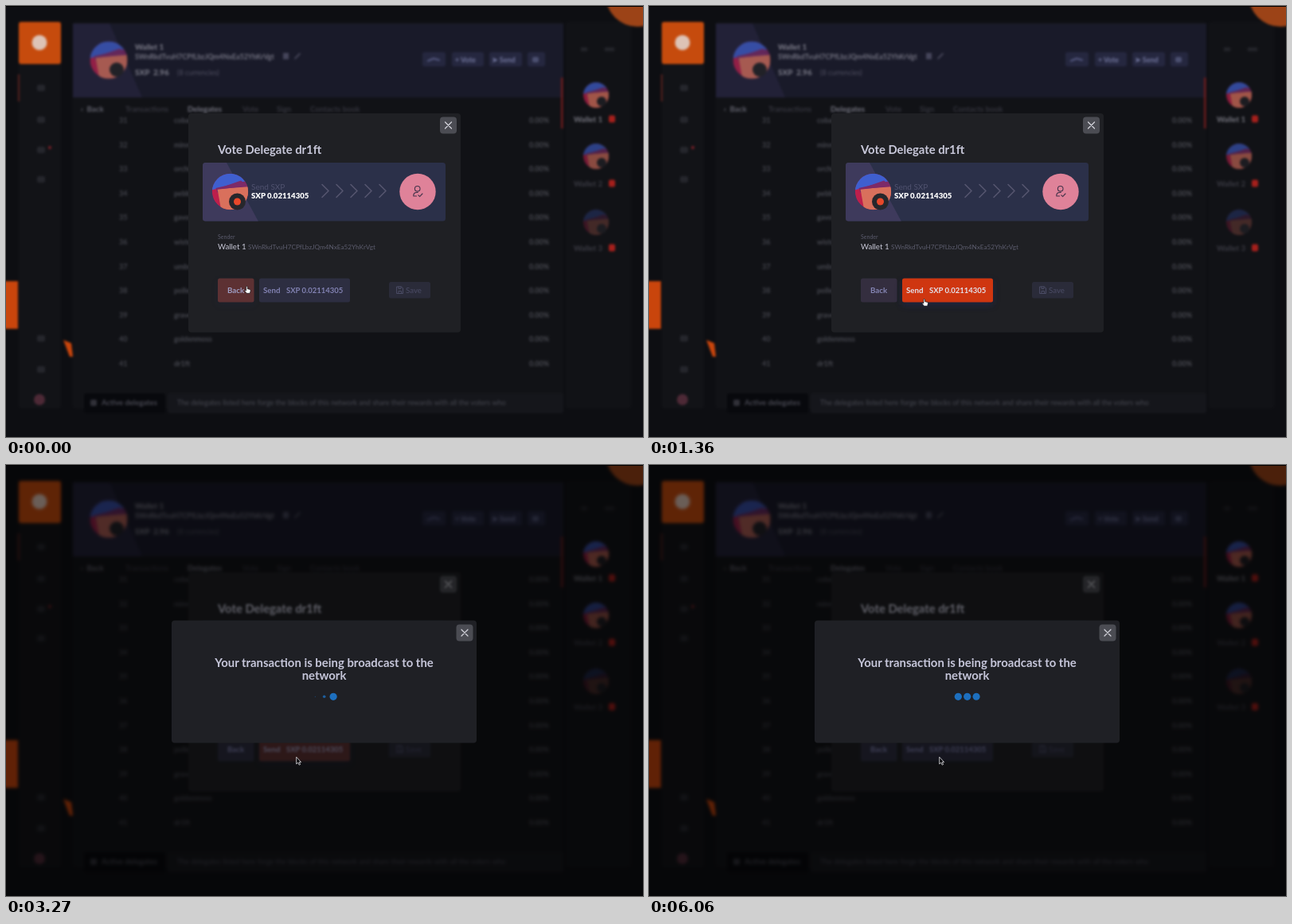
Recreate the animation shown at these times as an HTML page. Size 800x542 px, loop 6090 ms.

```html
<!DOCTYPE html>
<html lang="en">
<head>
<meta charset="utf-8">
<title>Vote confirmation</title>
<style>
  html, body { margin: 0; width: 100%; height: 100%; overflow: hidden; background: #08090c; }
  svg { display: block; width: 100vw; height: 100vh; }
  text { font-family: Lato, "Open Sans", sans-serif; white-space: pre; }
  #back { filter: blur(1.8px); }
  #scene.dimmed { filter: blur(1.8px) brightness(.48); }
</style>
</head>
<body>
<svg id="stage" viewBox="0 0 800 542"></svg>
<script>
const LOOP = 6090, SWITCH = 3082;

const rect = (x, y, w, h, fill, r = 0, more = '') =>
  `<rect x="${x}" y="${y}" width="${w}" height="${h}" rx="${r}" fill="${fill}" ${more}/>`;
const disc = (x, y, r, fill, more = '') => `<circle cx="${x}" cy="${y}" r="${r}" fill="${fill}" ${more}/>`;
const shape = (d, fill) => `<path d="${d}" fill="${fill}"/>`;
const line = (d, stroke, w = 1) =>
  `<path d="${d}" fill="none" stroke="${stroke}" stroke-width="${w}" stroke-linecap="round" stroke-linejoin="round"/>`;
const text = (x, y, size, fill, str, weight = 400, more = '') =>
  `<text x="${x}" y="${y}" font-size="${size}" fill="${fill}" font-weight="${weight}" ${more}>${str}</text>`;
const avatar = (x, y, r, opacity = 1) =>
  `<use href="#avatar" transform="translate(${x} ${y}) scale(${r})" opacity="${opacity}"/>`;
const closeButton = (x, y) => rect(x, y, 21, 21, '#4b4c53', 4) +
  line(`M${x + 6.5} ${y + 6.5}l8 8m0-8l-8 8`, '#d4d4dc', 1.2);

const defs = `<defs>
  <clipPath id="round"><circle r="1"/></clipPath>
  <clipPath id="card"><rect x="247" y="197" width="305" height="73.5" rx="3.5"/></clipPath>
  <filter id="glow" x="-30%" y="-60%" width="160%" height="220%"><feGaussianBlur stdDeviation="4"/></filter>
  <g id="avatar" clip-path="url(#round)">
    ${disc(0, 0, 1, '#bd1f4c')}
    ${shape('M-1-1H1V-.6L-1-.1z', '#3f5fcf')}
    ${shape('M-.8-.2L1-.62V-.05L-.7.05z', '#7d2a68')}
    ${shape('M-.7-.12L1-.32V1H-.5z', '#d9705c')}
    ${shape('M-.75-.14L.6-.62L1-.28z', '#7d2a68')}
  </g>
</defs>`;

function background() {
  const names = ['cobalt', 'minnow', 'orchid', 'pebble', 'gavotte', 'wisteria', 'umbra', 'pollen', 'gravel', 'quartzo'];
  let s = rect(-9, -9, 818, 560, '#0d0e12');
  s += rect(16, 20, 53, 486, '#121317', 4) + rect(84, 20, 616, 486, '#111216', 4) + rect(703, 20, 82, 486, '#111216', 4);
  s += disc(793, -14, 40, '#9c4317') + rect(-6, 346, 21, 60, '#c9450c');
  s += shape('M72 420L82 424L84 441L80 441z', '#c9450c');
  // sidebar
  s += rect(16, 20, 53, 53, '#c64b0d', 3) + disc(42, 46, 9.5, '#ddc3b6');
  for (const y of [103, 143, 181, 218, 418, 457]) s += rect(39, y - 4, 10, 8, '#25262c', 2);
  s += disc(55, 178, 2, '#7d2028') + disc(42, 495, 7, '#4d2936') + rect(15, 86, 2, 34, '#55201d');
  // account header
  s += rect(84, 22, 616, 93, '#191a29') + shape('M84 22H130L171 115H84z', '#222137');
  s += avatar(129, 68, 23.5, .72) + disc(139, 80, 9, '#212127');
  s += text(162, 55, 9.7, '#82828f', 'Wallet 1', 700);
  s += text(162, 66.5, 8.8, '#747482', 'SWnRkdTvuH7CPfLbzJQm4NxEa52YhKrVgt', 700);
  s += rect(348, 59, 7, 8, '#45455a') + line('M363 66l6-6', '#55556a', 1.5);
  s += text(162, 87, 10, '#80808d', 'SXP  2.96', 700) + text(215, 87, 9, '#4f4f60', '(8 currencies)');
  [[523, 29], [560, 40], [607, 41], [655, 22]].forEach(([x, w]) => s += rect(x, 58, w, 18, '#25273f', 3));
  s += line('M530 69l7-3l7 2', '#565a82', 2) + text(564, 71, 9, '#7478a0', '+ Vote', 700);
  s += text(610, 71, 9, '#7478a0', '➤ Send', 700) + rect(661, 64, 8, 7, '#4b4f70', 2);
  // tabs
  [[94, '‹  Back', '#62626d'], [150, 'Transactions', '#34343d'], [228, 'Delegates', '#73737f'],
   [297, 'Vote', '#34343d'], [340, 'Sign', '#34343d'], [382, 'Contacts book', '#34343d']]
    .forEach(([x, str, fill]) => s += text(x, 133, 9.7, fill, str, 700));
  // delegate table
  for (let i = 0; i <= 10; i++) {
    const y = 147 + i * 30.6, name = i === 10 ? 'dr1ft' : i === 9 ? 'goldenmoss' : names[i];
    s += text(142, y, 9, '#43444c', 31 + i, 700) + text(211, y, 9, '#484951', name, 700);
    s += text(657, y, 9, '#4a4b52', '0.00%', 700);
  }
  // footer
  s += rect(98, 487, 102, 25, '#08090d', 3) + rect(203, 487, 497, 25, '#15161b', 3);
  s += rect(106, 495, 8, 8, '#303038', 2) + text(120, 502, 9.5, '#484852', 'Active delegates', 700);
  s += text(215, 502, 9, '#474851',
    'The delegates listed here forge the blocks of this network and share their rewards with all the voters who', 400);
  // account list
  s += rect(697, 90, 2.5, 64, '#6d1b1b') + rect(722, 52, 8, 5, '#222329') + rect(752, 52, 12, 5, '#222329');
  [[112, .72, '#777780'], [189, .6, '#3b3b44'], [272, .25, '#3b3b44']].forEach(([y, o, fill], i) => {
    s += avatar(741, y, 16, o) + disc(748, y + 8, 6, '#1c1c21');
    const labelY = [145.5, 226.5, 307.5][i];
    s += text(713, labelY, 9.7, fill, `Wallet ${i + 1}`, 700) + rect(757, labelY - 8, 8, 9, '#a51f1b', 2);
  });
  return s;
}

function dialog() {
  let s = rect(229, 135, 342, 275.5, '#1f2024', 4) + closeButton(545, 139.5);
  s += text(266, 186, 14.8, '#c8c8da', 'Vote Delegate dr1ft', 700);
  s += `<g clip-path="url(#card)">${rect(247, 197, 305, 74, '#2b3049')}${shape('M247 197H277L317 271H247z', '#3e3a5c')}</g>`;
  s += avatar(281.5, 233.5, 22.7) + disc(290.5, 246, 10.5, '#27272c') + disc(290.5, 246, 4.5, '#e8482a');
  s += text(308, 231, 10, '#50526f', 'Send SXP') + text(308, 242, 9.6, '#fff', 'SXP 0.02114305', 900);
  for (let i = 0; i < 5; i++) s += line(`M${397 + 18 * i} 224.5l8 8l-8 8`, '#55566f', 1.6);
  s += disc(517, 233.5, 22.7, '#df8299') + disc(516.7, 229.8, 3.3, 'none', 'stroke="#43334a" stroke-width="1.1"');
  s += line('M515.5 239H511.8V237.6Q512.2 234.8 515.2 234.5H517.2M517.8 237.8l1.8 1.8l3.4-3.6', '#43334a', 1.1);
  s += text(266, 293, 7, '#5a5a6c', 'Sender') + text(266, 306, 9.7, '#cbcbda', 'Wallet 1');
  s += text(304, 306, 8.2, '#5c5c6d', 'SWnRkdTvuH7CPfLbzJQm4NxEa52YhKrVgt');
  const button = (id, x, w, label) => `<g id="${id}">
    ${rect(x, 346, w, 30, '#1d2552', 3, 'filter="url(#glow)" opacity="0"')}${rect(x, 342.5, w, 30, '#2d2e41', 2.5)}${label}</g>`;
  s += button('backButton', 266, 45.5, text(278, 360.5, 9.7, '#8282b2', 'Back', 700));
  s += button('sendButton', 318, 114, text(323, 360.5, 9.7, '#8282b2', 'Send', 700) +
    text(352, 360.5, 9.5, '#8282b2', 'SXP 0.02114305', 700));
  s += rect(481, 347, 52, 20.5, '#2a2b39', 2.5) + text(502, 360.5, 9.7, '#4b4c65', 'Save', 400);
  s += line('M491 353h5.5l2 2v6.5h-7.5zM493 353v2.5h3v-2.5M493 361.5v-3h3.5v3', '#4b4c65');
  return s;
}

const centred = 'text-anchor="middle"';
const notice = rect(208, 195.5, 383, 154, '#1f2025', 4) + closeButton(565.5, 200.5) +
  text(399.5, 254, 14.9, '#c6c6da', 'Your transaction is being broadcast to the', 700, centred) +
  text(399.5, 270, 14.9, '#c6c6da', 'network', 700, centred) +
  [388.3, 399.7, 411.1].map(x => disc(x, 291.3, 4.6, '#1d6fbe', 'class="dot"')).join('');

const hand = `<path d="M-1.4-4.2Q-.5-5.1 .3-4V-1.3L3.4-.6Q4.3-.2 4.1 1.2L3.4 4.3H-.8L-3.4 1Q-3.2-.1-1.4 .9z"
  fill="#fff" stroke="#15151a" stroke-width=".7"/>`;
const arrow = `<path d="M364.7 367.2V376L366.7 374.2L368.2 377.2L369.6 376.5L368.2 373.7H370.6z"
  fill="#0b0b0e" stroke="#e4e4e8" stroke-width=".8"/>`;

const stage = document.getElementById('stage');
stage.innerHTML = `${defs}${rect(0, 0, 800, 542, '#08090c')}
  <g id="scene"><g id="back">${background()}</g>${dialog()}</g>
  ${rect(0, 0, 800, 1, '#000')}
  <g id="hand">${hand}</g><g id="notice">${notice}${arrow}</g>`;
const el = id => document.getElementById(id);
const dots = [...document.querySelectorAll('.dot')];
dots.forEach(d => { d.style.transformBox = 'fill-box'; d.style.transformOrigin = 'center'; });

const clamp = v => Math.min(1, Math.max(0, v));
function bezier(x1, y1, x2, y2) {
  const at = (t, a, b) => 3 * (1 - t) ** 2 * t * a + 3 * (1 - t) * t * t * b + t ** 3;
  return x => {
    let lo = 0, hi = 1;
    for (let i = 0; i < 20; i++) {
      const mid = (lo + hi) / 2;
      if (at(mid, x1, x2) < x) lo = mid; else hi = mid;
    }
    return at(lo, y1, y2);
  };
}
const ease = bezier(.25, .1, .25, 1), pulse = bezier(.2, .68, .18, 1.08);
const fade = (t, start) => ease(clamp((t - start) / 300));
const mix = (a, b, k) => `rgb(${a.map((v, i) => Math.round(v + (b[i] - v) * k))})`;

function paintButton(id, k) {
  const [glow, face, ...labels] = el(id).children;
  glow.setAttribute('opacity', k * .8);
  face.setAttribute('fill', mix([45, 46, 65], [255, 57, 2], k));
  labels.forEach(l => l.setAttribute('fill', mix([130, 130, 178], [255, 255, 255], k)));
}

const path = [[0, 303, 357], [1060, 303, 357], [1220, 324, 367], [1350, 346, 373], [1500, 350, 373], [1800, 366, 372.5]];
function handAt(t) {
  const i = path.findIndex(p => p[0] > t);
  if (i < 0) return path[path.length - 1].slice(1);
  const [a, b] = [path[i - 1], path[i]], k = (t - a[0]) / (b[0] - a[0]);
  return [a[1] + (b[1] - a[1]) * k, a[2] + (b[2] - a[2]) * k];
}

// One pulse: shrink until 45 %, grow back until 80 %, then rest.
function dotScale(ms) {
  const p = ((ms % 750) + 750) % 750 / 750;
  if (p < .45) return [1 - .9 * pulse(p / .45), 1 - .3 * pulse(p / .45)];
  if (p < .8) return [.1 + .9 * pulse((p - .45) / .35), .7 + .3 * pulse((p - .45) / .35)];
  return [1, 1];
}

function draw(now) {
  const t = now % LOOP, sent = t >= SWITCH;
  el('scene').classList.toggle('dimmed', sent);
  el('notice').style.display = sent ? '' : 'none';
  el('hand').style.display = sent ? 'none' : '';
  el('hand').setAttribute('transform', `translate(${handAt(t)})`);
  paintButton('backButton', fade(t, -50) - fade(t, 1130));
  paintButton('sendButton', fade(t, 1220) - fade(t, 3130));
  dots.forEach((d, i) => {
    const [scale, opacity] = dotScale(t - SWITCH - i * 120);
    d.style.transform = `scale(${scale})`;
    d.style.opacity = opacity;
  });
}

const start = performance.now();
(function tick() {
  draw(performance.now() - start);
  requestAnimationFrame(tick);
})();
</script>
</body>
</html>
```
